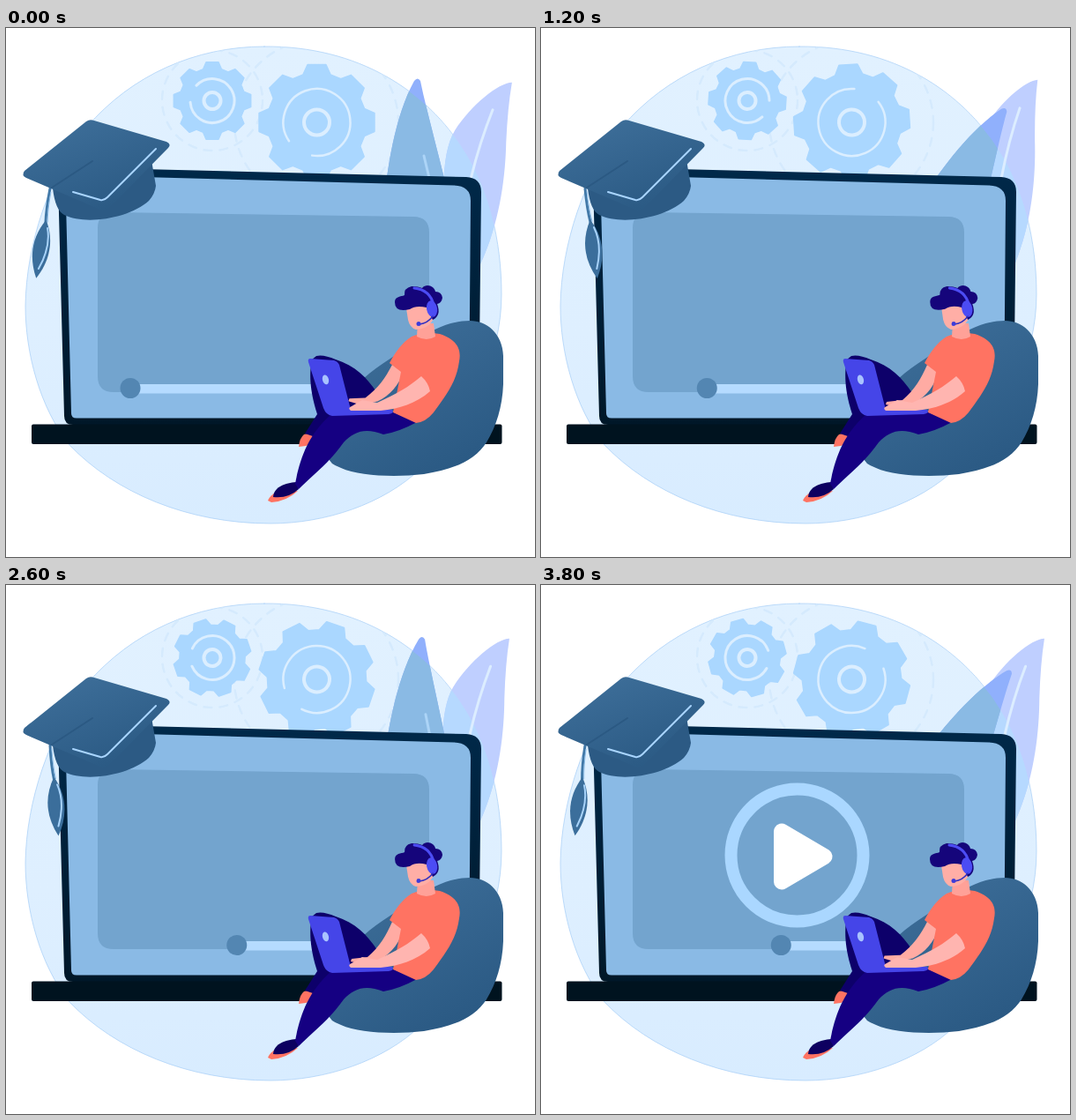
Recreate the animation shown at these times as an HTML page. Size 600 by 600 pixels, loop 4000 ms.

```html
<!DOCTYPE html>
<html lang="en">
<head>
<meta charset="utf-8">
<title>Online learning</title>
<style>
  html, body { margin: 0; width: 100%; height: 100%; overflow: hidden; background: #fff; }
  svg { display: block; width: 100vw; height: 100vh; }
</style>
</head>
<body>
<svg viewBox="0 0 600 600" fill="none" stroke-linecap="round" stroke-linejoin="round">
  <defs>
    <linearGradient id="sky" x1="0" y1="0" x2="0" y2="1">
      <stop stop-color="#e1f1ff"/><stop offset=".6" stop-color="#deefff"/><stop offset="1" stop-color="#d8ecff"/>
    </linearGradient>
    <linearGradient id="steel" x1="0" y1="0" x2=".6" y2="1">
      <stop stop-color="#40719c"/><stop offset="1" stop-color="#2b5a84"/>
    </linearGradient>
    <linearGradient id="frame" x1="0" y1="0" x2="0" y2="1">
      <stop stop-color="#00294a"/><stop offset="1" stop-color="#001728"/>
    </linearGradient>
    <linearGradient id="played">
      <stop stop-color="#8bbbe5"/><stop offset="1" stop-color="#73a4ce"/>
    </linearGradient>
    <path id="blobShape" d="M293 21C400 20 478 72 520 140C547 182 562 240 562 302C562 372 528 446 470 500C428 540 362 562 300 562C206 562 124 527 72 473C38 430 22 368 22 315C23 245 49 168 92 112C142 54 214 21 293 21Z"/>
    <clipPath id="inBlob"><use href="#blobShape"/></clipPath>
    <path id="rightLeafShape" d="M575 62C560 62 528 88 510 116C494 142 492 200 508 270L538 268C560 222 567 170 568 130Q570 90 575 62Z"/>
    <path id="leftLeafShape" d="M463 60Q467 55 470 60C475 85 486 125 499 178L428 206C432 160 441 100 463 60Z"/>
  </defs>

  <use href="#blobShape" fill="url(#sky)" stroke="#a5cdf6" stroke-width=".7"/>
  <g clip-path="url(#inBlob)">
    <g stroke="#d5eafd" stroke-width="2.500" stroke-dasharray="9 9">
      <circle cx="234" cy="82" r="57"/><circle cx="352" cy="107" r="93"/>
    </g>
    <g id="smallGear"></g>
    <g id="bigGear"></g>
  </g>

  <g fill="#bfcfff"><use class="rightLeaf" href="#rightLeafShape"/></g>
  <g fill="#b6d9ff" clip-path="url(#inBlob)"><use class="rightLeaf" href="#rightLeafShape"/></g>
  <path class="rightLeaf" d="M553 93Q538 130 528 170" stroke="#dcedff" stroke-width="3"/>
  <g fill="#90b0fc"><use class="leftLeaf" href="#leftLeafShape"/></g>
  <g fill="#8abae4" clip-path="url(#inBlob)"><use class="leftLeaf" href="#leftLeafShape"/></g>
  <path class="leftLeaf" d="M474 145L480 170" stroke="#acd4f7" stroke-width="3"/>

  <path d="M72 158L522 169Q539 170 539 186L536 450H76Q66 450 66 440L59 172Q59 158 72 158Z" fill="url(#frame)"/>
  <path d="M80 167L508 178.500Q527 179 527 196L525 442.500H80Q74 442.500 74 437L67.500 178Q67.500 167 80 167Z" fill="#8abae5"/>
  <path d="M122 209L462 214Q480 214 480 232V413H122Q104 413 104 395V227Q104 209 122 209Z" fill="#73a4ce"/>
  <rect id="remaining" y="404" height="10.500" fill="#b5dbff"/>
  <rect id="played" x="132" y="404" height="10.500" rx="2" fill="url(#played)"/>
  <circle id="knob" cy="408.500" r="11.500" fill="#5386b2"/>

  <g id="play">
    <circle r="75" stroke="#aad7ff" stroke-width="14"/>
    <path d="M-17.500-27V30L31 1.500Z" fill="#fff" stroke="#fff" stroke-width="18"/>
  </g>
  <rect x="29" y="449.500" width="533.500" height="22.500" rx="2" fill="#00131f"/>

  <g id="tassel">
    <path d="M50 182Q49 205 51 222" stroke="#4279a8" stroke-width="3"/>
    <path d="M51.500 186Q51 205 53 220" stroke="#8fbde6"/>
    <path d="M51 218C38 240 38 262 50 285C62 264 64 240 51 218Z" fill="#3b6e9b"/>
    <path d="M54 227Q61 248 51 274" stroke="#a8d3fa" stroke-width="2"/>
  </g>
  <path d="M53 182Q56 207 66 212C90 224 140 216 162 196Q169 188 170 179L165 150L112 204Z" fill="#2c5a84"/>
  <path d="M21 162L91 106Q95 103 100 105L182 129Q188 132 184 136L118 203Q113 208 107 206L23 170Q17 167 21 162Z" fill="url(#steel)"/>
  <path d="M52 181L98 151" stroke="#2b5983" stroke-width="2"/>
  <path d="M76 186L107 195Q111 196 115 192L170 137" stroke="#a9d5ff" stroke-width="2"/>

  <path d="M405 398C425 380 445 370 465 355C485 340 507 332 526 332C545 332 563 346 564 372V404C563 430 556 452 545 470C532 490 510 500 474 506C440 510 400 508 380 499Q366 494 366 487L400 440Z" fill="url(#steel)"/>

  <path d="M346 459L353 463Q346 472 340 474L332 475Q333 465 338 461Z" fill="#ff7362"/>
  <path d="M352 372Q360 370 374 376C396 383 410 397 421 414L390 442L362 454L351 464L339 460L353 438C344 410 344 390 347 376Z" fill="#0d006a"/>
  <path d="M297 536Q300 529 307 527L331 525Q318 537 301 538Z" fill="#ff7362"/>
  <path d="M303 532C304 520 317 516 329 515L332 523Q320 534 303 532Z" fill="#0d0060"/>
  <path d="M368 439L440 436L466 447Q446 458 428 461C408 453 395 457 383 470C365 495 350 505 332 523L328 517C333 490 342 462 368 439Z" fill="#150082"/>

  <path id="farArm" d="M438 382L451 389C447 405 438 417 424 425L404 430L391 427L392 424L410 422C424 410 431 398 438 382Z" fill="#ffaba3"/>
  <path d="M460 350Q474 344 492 347C510 353 517 363 514 378C511 402 498 418 485 436Q476 447 465 448L439 436L448 390L435 380C442 367 449 357 460 350Z" fill="#ff7362"/>
  <path d="M345 375L372 377Q376 378 378 382L391 433L438 433Q441 437 434 438L370 440Q363 439 360 431L343 379Q342 375 345 375Z" fill="#4545e8"/>
  <ellipse cx="362.500" cy="399" rx="3.500" ry="5.500" fill="#a9c3ff" transform="rotate(-15 362 399)"/>
  <path id="nearArm" d="M471 395Q479 402 481 412C465 426 446 432 425 434L391 434Q387 431 392 429L404 422L421 425C443 415 457 407 471 395Z" fill="#ffb5b0"/>

  <path d="M467 335H485L487 350Q477 356 466 350Z" fill="#ffa198"/>
  <g id="head">
    <path d="M454 318L478 309L486 327Q481 341 465 342Q458 340 456 331Z" fill="#ffaea6"/>
    <path d="M441 311C441 304 448 305 452 303Q451 295 460 293Q468 293 472 295C477 289 486 293 487 299Q494 299 495 306Q494 312 489 313Q494 326 484 331L477 317Q465 314 458 319Q441 323 441 311Z" fill="#15057b"/>
    <path d="M463 295Q481 297 485 314" stroke="#4c4cf4" stroke-width="3"/>
    <ellipse cx="483" cy="318.500" rx="6" ry="9.500" fill="#4c4cf4" transform="rotate(-10 483 318)"/>
    <path d="M484 327Q478 335 469 336" stroke="#3030c0" stroke-width="1.500"/>
    <circle cx="468" cy="335.500" r="2.500" fill="#3c3cda"/>
  </g>
</svg>
<script>
const LOOP = 4000, STEP = 200;
const $ = id => document.getElementById(id);
const clamp = (v, lo, hi) => Math.min(hi, Math.max(lo, v));
const ease = p => (1 - Math.cos(Math.PI * p)) / 2;
const bump = (t, from, to) => Math.sin(Math.PI * clamp((t - from) / (to - from), 0, 1)) ** 2;
const spin = (node, angle, x, y) => node.setAttribute('transform', `rotate(${angle} ${x} ${y})`);
const spinAll = (name, angle, x, y) =>
  document.querySelectorAll('.' + name).forEach(node => spin(node, angle, x, y));

function polar(r, deg) {
  const a = deg * Math.PI / 180;
  return `${(r * Math.cos(a)).toFixed(2)} ${(r * Math.sin(a)).toFixed(2)}`;
}

function buildGear(id, { outer, root, ring, ringWidth, hub, gap }) {
  const points = [];
  for (let a = 0; a < 360; a += 45) {
    points.push(polar(root, a - 16), polar(outer, a - 9), polar(outer, a + 9), polar(root, a + 16));
  }
  const edge = `M${points.join('L')}Z`;
  const arc = `M${polar(ring, gap + 24)}A${ring} ${ring} 0 1 1 ${polar(ring, gap - 24)}`;
  $(id).innerHTML =
    `<path d="${edge}" fill="#aad7ff" stroke="#aad7ff" stroke-width="2"/>
     <path d="${arc}" stroke="#dbeeff" stroke-width="${ringWidth}"/>
     <circle r="${hub}" stroke="#dbeeff" stroke-width="4"/>`;
}
buildGear('smallGear', { outer: 44, root: 37, ring: 25, ringWidth: 3, hub: 9.5, gap: 200 });
buildGear('bigGear', { outer: 66, root: 56, ring: 38, ringWidth: 2.5, hub: 14.5, gap: 122 });

// Swings settle into a steady period after a slower first rise.
const leafAngle = t => 33 * (t < 1580
  ? ease(clamp((t - 200) / 1380, 0, 1))
  : ease(1 + (t - 1580) / 1220));
const tasselSwing = t => t < 1200 ? ease(t / 1200) : ease(1 + (t - 1200) / 800);

function gearAngle(t) {
  return t < 2100 ? t * 0.147 : (t - 2200) * 0.147 - 40;
}

function draw(t) {
  const turn = gearAngle(t);
  $('bigGear').setAttribute('transform', `translate(352.5 107) rotate(${turn})`);
  $('smallGear').setAttribute('transform', `translate(234 82.5) rotate(${-turn})`);

  spinAll('leftLeaf', leafAngle(t), 427, 198);
  const sway = Math.cos(2 * Math.PI * (t - 200) / 2000);
  spinAll('rightLeaf', 1.6 * (sway - 1), 510, 270);
  spin($('tassel'), 8.8 - 16.5 * tasselSwing(t), 50, 182);

  const x = 141 + 0.0525 * (clamp(t, 300, 2800) - 300);
  $('knob').setAttribute('cx', x);
  $('played').setAttribute('width', x - 132);
  $('remaining').setAttribute('x', x);
  $('remaining').setAttribute('width', 370 - x);

  const scale = 1 - 0.12 * (1 - clamp((t - 3000) / 400, 0, 1)) ** 2;
  $('play').setAttribute('transform', `translate(290.5 306.5) scale(${scale})`);
  $('play').setAttribute('visibility', t >= 3000 ? 'visible' : 'hidden');

  spin($('head'), 3.2 * bump(t, 1000, 2700) + 1.8 * bump(t, 2600, 3800), 477, 350);
  spin($('farArm'), 4 * bump(t, -600, 600) + 7 * bump(t, 1800, 2600) + 5 * bump(t, 3400, 4600), 445, 386);
  spin($('nearArm'), 2 * bump(t, 1900, 2500), 476, 404);
}

function tick() {
  draw(Math.floor(performance.now() % LOOP / STEP) * STEP);
  requestAnimationFrame(tick);
}
tick();
</script>
</body>
</html>
```
